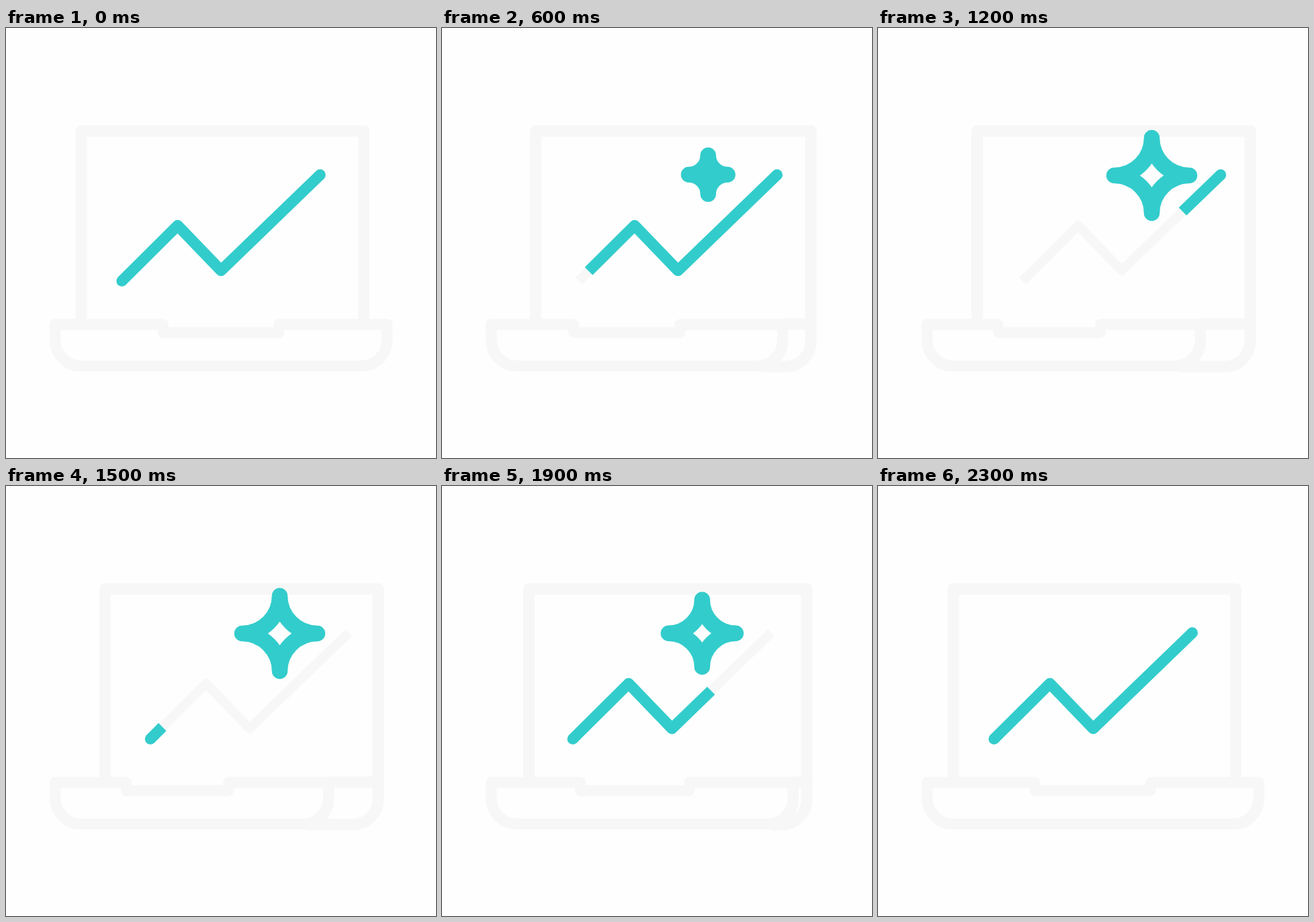
An HTML page with a canvas that plays this animation: 640x640 px, repeating every 2.5 s.

```html
<!DOCTYPE html>
<html lang="en">
<head>
<meta charset="utf-8">
<title>Laptop chart</title>
<style>
  html, body { margin: 0; width: 100%; height: 100%; overflow: hidden; background: #fefefe; }
  canvas { display: block; }
</style>
</head>
<body>
<canvas id="stage" width="640" height="640"></canvas>
<script>
const ctx = document.getElementById('stage').getContext('2d');
const TEAL = '#33cccc', PALE = '#f7f7f7';
const LOOP = 2500, STEP = 50;
const CHART = [[172.5, 376.5], [255.5, 294], [320, 361], [467.5, 218.5]];
const CHART_LENGTH = 415;

const progress = (t, from, to) => Math.min(1, Math.max(0, (t - from) / (to - from)));
const smooth = u => (1 - Math.cos(Math.PI * u)) / 2;
const ease = (t, from, to) => smooth(progress(t, from, to));
const mix = (a, b, k) => a + (b - a) * k;

function stroke(color, width, cap, trace) {
  ctx.strokeStyle = color;
  ctx.lineWidth = width;
  ctx.lineCap = cap;
  ctx.lineJoin = 'round';
  ctx.beginPath();
  trace();
  ctx.stroke();
}

function polyline(points) {
  points.forEach(([x, y]) => ctx.lineTo(x, y));
}

function laptop(screenTurn, baseTurn) {
  const left = mix(112, 147.5, screenTurn);
  const right = mix(532.5, 554, screenTurn);
  const front = mix(567, 480, baseTurn);
  const notchLeft = mix(233.5, 178.5, baseTurn);
  const notchRight = mix(406.5, 331.5, baseTurn);

  stroke(PALE, 17, 'butt', () => {
    polyline([[left, 441], [left, 153.3], [right, 153.3], [right, 441]]);
  });
  if (front < right) {
    stroke(PALE, 17, 'round', () => {
      polyline([[front, 440.7], [right, 440.7], [right, 466]]);
      ctx.arcTo(right, 504, right - 38, 504, 38);
      ctx.lineTo(front - 30, 504);
    });
  }
  stroke(PALE, 16.5, 'round', () => {
    polyline([
      [73.3, 441.2], [notchLeft, 441.2], [notchLeft + 1, 453.5],
      [notchRight - 1, 453.5], [notchRight, 441.2], [front, 441.2]
    ]);
    ctx.arcTo(front, 503, front - 38, 503, 38);
    ctx.arcTo(73.3, 503, 73.3, 465, 38);
    ctx.closePath();
  });
}

function dot([x, y]) {
  ctx.fillStyle = TEAL;
  ctx.beginPath();
  ctx.arc(x, y, 8.25, 0, 2 * Math.PI);
  ctx.fill();
}

// Teal part of the chart between two fractions of its length
function chartPart(from, to) {
  if (to - from < 0.001) return;
  ctx.setLineDash([CHART_LENGTH * (to - from), 1000]);
  ctx.lineDashOffset = -CHART_LENGTH * from;
  stroke(TEAL, 16.5, 'butt', () => polyline(CHART));
  ctx.setLineDash([]);
  if (from < 0.005) dot(CHART[0]);
  if (to > 0.995) dot(CHART[3]);
}

function chart(shift, erased, drawn) {
  ctx.save();
  ctx.translate(shift, 0);
  stroke(PALE, 14, 'butt', () => polyline(CHART));
  chartPart(erased, 1);
  chartPart(0, drawn);
  ctx.restore();
}

function star(x, y, r) {
  if (r < 1) return;
  ctx.save();
  ctx.translate(x, y);
  stroke(TEAL, 23.5, 'round', () => {
    ctx.arc(r, -r, r, Math.PI, Math.PI / 2, true);
    ctx.arc(r, r, r, -Math.PI / 2, -Math.PI, true);
    ctx.arc(-r, r, r, 0, -Math.PI / 2, true);
    ctx.arc(-r, -r, r, Math.PI / 2, 0, true);
    ctx.closePath();
  });
  ctx.restore();
}

function draw(time) {
  const t = Math.floor(time % LOOP / STEP) * STEP;
  const chartTurn = ease(t, 70, 880) - ease(t, 1480, 2345);
  const screenTurn = ease(t, -40, 900) - ease(t, 1465, 2325);
  const baseTurn = ease(t, 110, 895) - ease(t, 1480, 2330);
  const erased = smooth(progress(t, 350, 1450) ** 1.31);
  const drawn = ease(t, 1366, 2211);
  const starSize = ease(t, 465, 730) - ease(t, 1830, 2160);
  const shift = 42.5 * chartTurn;

  ctx.fillStyle = '#fefefe';
  ctx.fillRect(0, 0, 640, 640);
  laptop(screenTurn, baseTurn);
  chart(shift, erased, drawn);
  star(365 + shift, 217 + 2.5 * starSize, 56 * starSize);
}

function tick() {
  draw(performance.now());
  requestAnimationFrame(tick);
}
tick();
</script>
</body>
</html>
```
